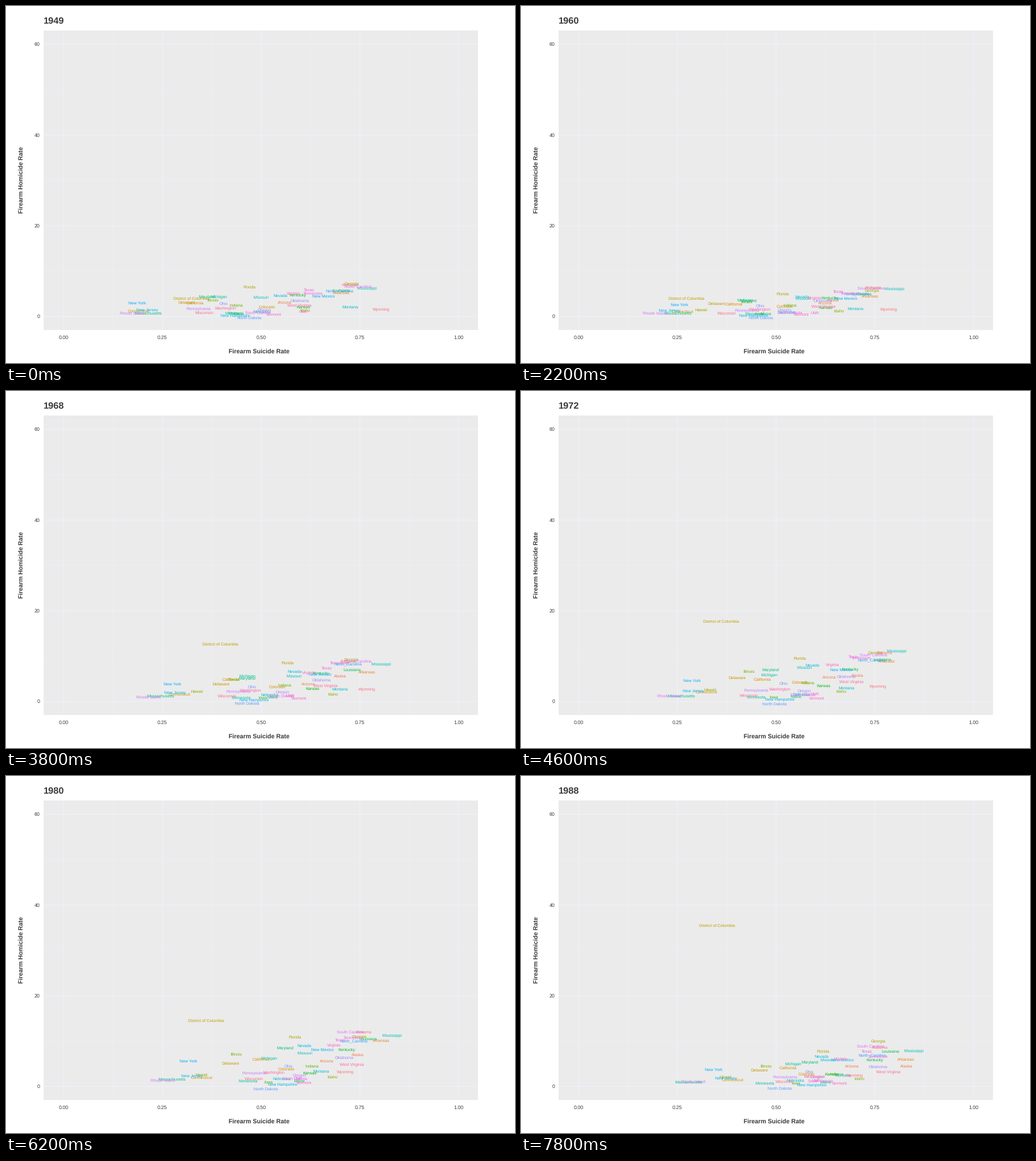
A matplotlib script for the animation above (8000 ms loop, 894 px wide and 627 px high).

```python
import numpy as np
import matplotlib.pyplot as plt
from matplotlib.animation import FuncAnimation
from matplotlib.patches import Rectangle

W, H, DPI = 894, 627, 64
PX = 72 / DPI  # points per pixel
INK = "#3C3C3C"
FIRST, COUNT = 1949, 40
YEARS = FIRST + np.arange(COUNT)
LEFT, RIGHT, TOP, BOTTOM = 66, 829, 43, 569

# National homicide level, and the capital's own path, at the key years
KEYS = (1949, 1956, 1964, 1968, 1975, 1980, 1988)
WAVE = (0.78, 0.62, 0.74, 1.05, 1.42, 1.37, 1.0)
CAPITAL = "District of Columbia"
CAPITAL_X = (0.323, 0.192, 0.354, 0.396, 0.333, 0.361, 0.351)
CAPITAL_Y = (4, 2.6, 5.3, 12.6, 21.4, 14.5, 35.5)

# States from highest to lowest homicide rate: suicide percentage, first and last year
STATES = {
    "Georgia": (73, 76), "Alabama": (73, 76), "Mississippi": (78, 83),
    "South Carolina": (75, 74), "Florida": (48, 62), "Texas": (62, 73),
    "Louisiana": (70, 79), "Tennessee": (64, 77), "North_Carolina": (71, 74),
    "Arkansas": (71, 83), "Nevada": (54, 64), "Virginia": (58, 69),
    "Kentucky": (57, 76), "Missouri": (49, 66), "New Mexico": (66, 67),
    "Maryland": (38, 59), "Michigan": (40, 54), "Alaska": (56, 83),
    "Illinois": (38, 48), "Oklahoma": (60, 74), "Arizona": (58, 69),
    "California": (35, 52), "Delaware": (32, 47), "New York": (20, 35),
    "West Virginia": (58, 77), "Ohio": (41, 59), "Indiana": (45, 66),
    "Colorado": (50, 59), "Kansas": (62, 64), "Wyoming": (81, 71),
    "Montana": (74, 65), "Washington": (41, 57), "Pennsylvania": (35, 52),
    "Hawaii": (28, 38), "Oregon": (50, 62), "New Jersey": (20, 37),
    "Idaho": (61, 72), "Connecticut": (19, 41), "Nebraska": (51, 56),
    "Utah": (58, 59), "South Dakota": (49, 62), "Wisconsin": (34, 51),
    "Massachusetts": (20, 29), "Rhode Island": (16, 28), "Maine": (43, 63),
    "Minnesota": (43, 48), "Iowa": (44, 55), "Vermont": (53, 64),
    "New Hampshire": (41, 57), "North Dakota": (46, 52),
}
JOINED = {"Alaska": 1960, "Hawaii": 1960}

plt.rcParams["font.family"] = "Liberation Sans"
plt.rcParams["text.hinting"] = "none"

fig = plt.figure(figsize=(W / DPI, H / DPI), dpi=DPI, facecolor="white")
ax = fig.add_axes([0, 0, 1, 1])
ax.set_xlim(0, W)
ax.set_ylim(H, 0)
ax.axis("off")


def to_x(rate):
    return 101.3 + 693.6 * rate


def to_y(rate):
    return 545.3 - 7.967 * rate


def hcl(hue, chroma=100, lum=65):
    """Polar CIE-LUV colour to sRGB, clipped to the gamut."""
    un, vn = 0.1978398, 0.4683363
    y = ((lum + 16) / 116) ** 3
    u = chroma * np.cos(np.radians(hue)) / (13 * lum) + un
    v = chroma * np.sin(np.radians(hue)) / (13 * lum) + vn
    x = 9 * y * u / (4 * v)
    z = -x / 3 - 5 * y + 3 * y / v
    rgb = np.array([
        3.240479 * x - 1.537150 * y - 0.498535 * z,
        -0.969256 * x + 1.875992 * y + 0.041556 * z,
        0.055648 * x - 0.204043 * y + 1.057311 * z,
    ])
    rgb = np.clip(rgb, 0, 1)
    return np.where(rgb > 0.00304, 1.055 * rgb ** (1 / 2.4) - 0.055, 12.92 * rgb)


def write(x, y, text, size, **kw):
    kw = {"color": INK, "ha": "center", "va": "baseline", **kw}
    return ax.text(x, y, text, fontsize=size * PX, **kw)


def grid_line(xs, ys, major):
    ax.plot(xs, ys, color="#EFEFFB", lw=(1.5 if major else 0.8) * PX,
            solid_capstyle="butt", snap=False, zorder=1)


def draw_panel():
    ax.add_patch(Rectangle((LEFT, TOP), RIGHT - LEFT, BOTTOM - TOP,
                           fc="#EBEBEB", ec="none", zorder=0))
    for i in range(9):
        x, major = to_x(i / 8), i % 2 == 0
        grid_line([x, x], [TOP, BOTTOM], major)
        if major:
            write(x, 584.9, f"{i / 8:.2f}", 8.9)
    for i in range(7):
        y, major = to_y(10 * i), i % 2 == 0
        grid_line([LEFT, RIGHT], [y, y], major)
        if major:
            write(59.3, y + 3, str(10 * i), 8.9, ha="right")
    write(444.5, 610.6, "Firearm Suicide Rate", 10.75, weight="bold")
    write(33, 305.5, "Firearm Homicide Rate", 10.75, weight="bold",
          rotation=90, ha="right", va="center")


def make_paths():
    """Suicide and homicide rate of every state for every year."""
    rng = np.random.default_rng(7)
    wave = np.interp(YEARS, KEYS, WAVE)
    paths = {CAPITAL: (np.interp(YEARS, KEYS, CAPITAL_X),
                       np.interp(YEARS, KEYS, CAPITAL_Y))}
    for t, (name, (start, end)) in zip(np.linspace(0, 1, len(STATES)), STATES.items()):
        level = 9.2 * (1 - t) ** 1.6 + 0.7 * t - 1.1 * t ** 60
        x = np.linspace(start, end, COUNT) / 100 + rng.normal(0, 0.012, COUNT)
        y = wave * level * (1 + rng.normal(0, 0.06, COUNT))
        paths[name] = x, y
    return paths


draw_panel()
title = write(65.6, 30.6, "", 16.4, weight="bold", ha="left")
paths = make_paths()
names = sorted(paths, key=lambda name: name.replace("_", " "))
labels = {name: write(0, 0, name, 7.2, color=hcl(15 + 360 * i / len(names)), zorder=3)
          for i, name in enumerate(names)}


def update(frame):
    year = FIRST + frame
    title.set_text(str(year))
    for name, label in labels.items():
        xs, ys = paths[name]
        label.set_visible(year >= JOINED.get(name, FIRST))
        label.set_position((to_x(xs[frame]), to_y(ys[frame]) + 2.2))
    return [title, *labels.values()]


anim = FuncAnimation(fig, update, frames=COUNT, interval=200,
                     repeat=True, repeat_delay=0, blit=False)
plt.show()
```
